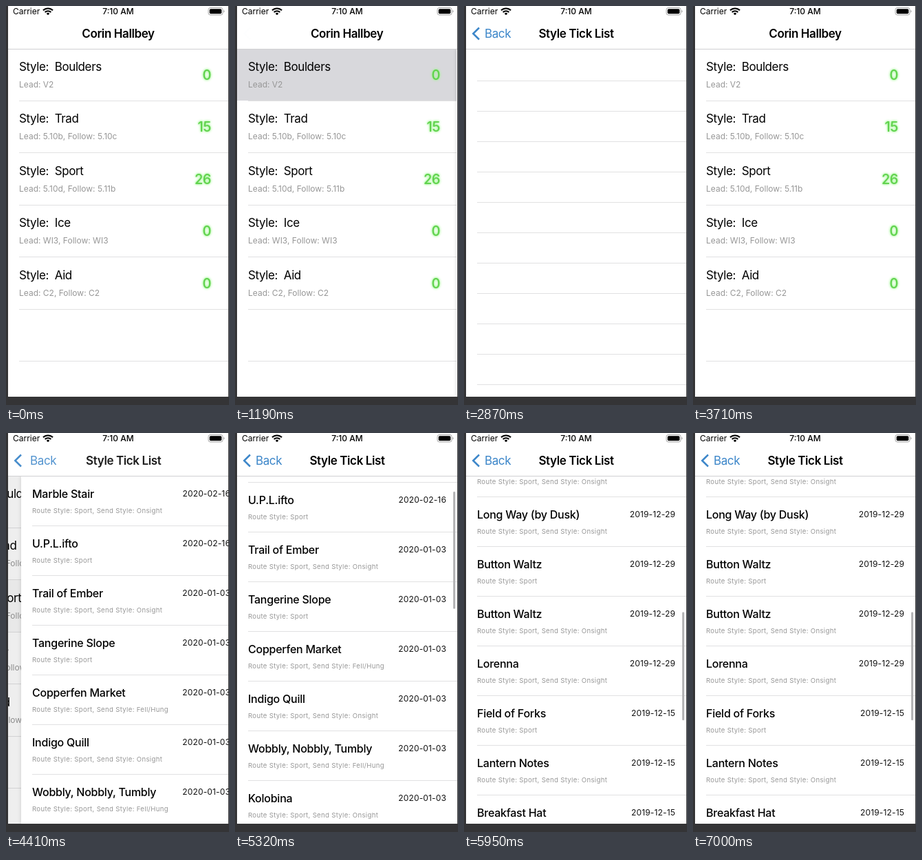
Recreate the animation shown at these times as an HTML page. Size 324x578 px, loop 7.14 s.

```html
<!DOCTYPE html>
<html lang="en">
<head>
<meta charset="utf-8">
<title>Climbing tick list</title>
<style>
  html, body { margin: 0; width: 100%; height: 100%; overflow: hidden; background: #343436; }
  body { position: relative; font: 17px/20px Inter, "Open Sans", sans-serif; color: #000; }
  div, span, svg { position: absolute; }
  span { white-space: pre; }

  #screen { left: 3px; top: 0; width: 320px; height: 566px; overflow: hidden; background: #fff; }
  .page { left: 0; top: 62px; width: 320px; height: 504px; overflow: hidden; background: #fff; }
  #list { overflow: visible; box-shadow: -1px 0 5px rgba(0, 0, 0, .1); }
  #shade { inset: 0; background: #000; }

  .row { left: 0; width: 320px; }
  .row i { position: absolute; left: 16px; right: 0; height: 1px; background: #e1e1e2; }
  .name, .note { left: 16px; }
  .name { top: 16px; }
  .note { color: #979797; }

  #home .row { height: 75.4px; }
  #home i { top: 75px; }
  #home .name { letter-spacing: -.4px; }
  #home .note { top: 42px; font-size: 12px; }
  .count { right: 25px; top: 28px; font-size: 20px; font-weight: 500; letter-spacing: -.4px;
    color: #5fd24c; text-shadow: 0 0 3px #8cf07c, 0 0 4px #b4f7a8; }

  #ticks .row { height: 72px; }
  #ticks i { top: 0; }
  #ticks .name { font-size: 16px; font-weight: 500; letter-spacing: -.25px; }
  #ticks .note { top: 41px; font-size: 9.6px; letter-spacing: .32px; }
  .date { right: 16px; top: 16px; font-size: 12px; letter-spacing: .15px; color: #111; }

  #lines { left: 16px; right: 0; top: 0; height: 528px;
    background: repeating-linear-gradient(transparent 0 43px, #e1e1e2 43px 44px); }
  #thumb { right: 3px; width: 3px; border-radius: 2px; background: #b3b3b5; }

  #nav { left: 0; top: 0; width: 320px; height: 62px; background: #fff; border-bottom: 1px solid #d0d0d2; }
  .title { left: 0; width: 320px; top: 30px; text-align: center; font-weight: 600; letter-spacing: -.4px; }
  #back { left: 27px; top: 30px; letter-spacing: -.4px; color: #3c86c9; }
  #chevron { left: 8px; top: 30px; }
  .status { top: -2px; font-size: 12px; }
</style>
</head>
<body>
<div id="screen">
  <div class="page" id="home"></div>
  <div class="page" id="list">
    <div id="lines"></div>
    <div id="ticks"></div>
    <div id="thumb"></div>
  </div>
  <div id="nav">
    <span class="status" style="left:7px">Carrier</span>
    <span class="status" style="left:0;width:320px;text-align:center;font-weight:500">7:10 AM</span>
    <svg width="320" height="20" viewBox="3 0 320 20" style="left:0;top:0">
      <g fill="none" stroke="#000" stroke-width="2">
        <path d="M54 6.3A9.9 9.9 0 0 1 68 6.3M56.6 9A6.2 6.2 0 0 1 65.4 9"/>
      </g>
      <path d="M61 13.2L58.8 10.9A3.1 3.1 0 0 1 63.2 10.9Z"/>
      <rect x="294" y="2.5" width="21" height="10.5" rx="3" fill="none" stroke="#a6a6a6"/>
      <rect x="295.7" y="4.2" width="17.6" height="7.1" rx="1.7"/>
      <path d="M316.3 6V9.6Q317.6 9 317.6 7.8T316.3 6Z" fill="#a6a6a6"/>
    </svg>
    <span class="title" id="homeTitle">Corin Hallbey</span>
    <span class="title" id="listTitle">Style Tick List</span>
    <svg id="chevron" width="14" height="20" fill="none" stroke="#3c86c9" stroke-width="2.5">
      <path d="M11 1.5L2.3 10L11 18.5"/>
    </svg>
    <span id="back">Back</span>
  </div>
</div>
<script>
const LOOP = 7140, STEP = 70, WIDTH = 320, VIEW = 504;
const $ = id => document.getElementById(id);
const clamp = v => Math.min(1, Math.max(0, v));

const styles = [
  ['Boulders', 'Lead: V2', 0],
  ['Trad', 'Lead: 5.10b, Follow: 5.10c', 15],
  ['Sport', 'Lead: 5.10d, Follow: 5.11b', 26],
  ['Ice', 'Lead: WI3, Follow: WI3', 0],
  ['Aid', 'Lead: C2, Follow: C2', 0]
];
const ticks = [
  ['Marble Stair', 'Onsight', '2020-02-16'],
  ['U.P.L.ifto', '', '2020-02-16'],
  ['Trail of Ember', 'Onsight', '2020-01-03'],
  ['Tangerine Slope', '', '2020-01-03'],
  ['Copperfen Market', 'Fell/Hung', '2020-01-03'],
  ['Indigo Quill', 'Onsight', '2020-01-03'],
  ['Wobbly, Nobbly, Tumbly', 'Fell/Hung', '2020-01-03'],
  ['Kolobina', 'Onsight', '2020-01-03'],
  ['Gravel Song', 'Onsight', '2019-12-29'],
  ['Long Way (by Dusk)', 'Onsight', '2019-12-29'],
  ['Button Waltz', '', '2019-12-29'],
  ['Button Waltz', 'Onsight', '2019-12-29'],
  ['Lorenna', 'Onsight', '2019-12-29'],
  ['Field of Forks', '', '2019-12-15'],
  ['Lantern Notes', 'Onsight', '2019-12-15'],
  ['Breakfast Hat', 'Onsight', '2019-12-15']
];

const span = (cls, text) => `<span class="${cls}">${text}</span>`;
const row = (top, line, ...parts) =>
  `<div class="row" style="top:${top}px">${line ? '<i></i>' : ''}${parts.join('')}</div>`;

$('home').innerHTML = styles.map(([name, note, count], i) =>
  row(i * 75.4, true, span('name', 'Style:  ' + name), span('note', note), span('count', count))
).join('') + row(5 * 75.4, true) + '<div id="shade"></div>';

$('ticks').innerHTML = ticks.map(([name, send, date], i) =>
  row(i * 72, i > 0, span('name', name),
    span('note', 'Route Style: Sport' + (send && ', Send Style: ' + send)), span('date', date))
).join('');

const homeRows = $('home').querySelectorAll('.row');
const tickRows = $('ticks').querySelectorAll('.row');

// Share of a critically damped spring still to travel.
const rest = (ms, speed) => {
  const x = Math.max(0, ms) / 1000 * speed;
  return (1 + x) * Math.exp(-x);
};

function pushed(t) {
  if (t < 3160) return 1 - rest(t - 1185, 16);
  if (t < 4000) return rest(t - 3160, 16);
  return 1 - rest(t - 4125, 16);
}

function pull(t) {
  const rise = Math.sin(clamp((t - 1960) / 490) * Math.PI / 2);
  return Math.round(80 * rise * rest(t - 2450, 12));
}

// A short drag, then a decaying fling halted by touch.
function scrollTop(t) {
  if (t < 5320) return 0;
  const glide = s => 1 - Math.exp(-2 * s);
  return Math.round(63 + 555 * glide(Math.min(.63, (t - 5320) / 1000)) / glide(.63));
}

function flash(el, t, start) {
  const a = t < start ? 0 : clamp(1 - (t - start) / 420);
  el.style.background = `rgba(209,209,214,${a})`;
}

function place(id, x, y, opacity = 1) {
  $(id).style.transform = `translate(${x}px,${y}px)`;
  $(id).style.opacity = opacity;
}

function draw(t) {
  const p = pushed(t), left = Math.round((1 - p) * WIDTH);
  const open = 1 - left / WIDTH;
  const sport = t >= 4000;

  place('home', -Math.round(96 * open), 0);
  $('shade').style.opacity = .07 * open;
  place('list', left, 0);
  $('list').style.visibility = open ? 'visible' : 'hidden';

  const dim = t >= 3080 && t < 4000 ? .3 : 1;
  place('homeTitle', -112 * open, 0, clamp(1 - 1.5 * open));
  place('listTitle', 130 * (1 - open), 0, open * open);
  place('back', 85 * (1 - open), 0, open * open * dim);
  place('chevron', 0, 0, open * dim);

  $('lines').style.display = sport ? 'none' : '';
  $('ticks').style.display = sport ? '' : 'none';
  place('lines', 0, pull(t));

  const y = scrollTop(t), size = 170 - 13 * clamp((y - 63) / 555);
  place('ticks', 0, -y);
  place('thumb', 0, 3 + y / 1584 * (VIEW - 6), y ? 1 : 0);
  $('thumb').style.height = size + 'px';

  flash(homeRows[0], t, 1120);
  flash(homeRows[2], t, 4060);
  flash(tickRows[10], t, 6580);
}

const start = performance.now();
function tick() {
  const t = (performance.now() - start) % LOOP;
  draw(Math.floor(t / STEP) * STEP);
  requestAnimationFrame(tick);
}
tick();
</script>
</body>
</html>
```
